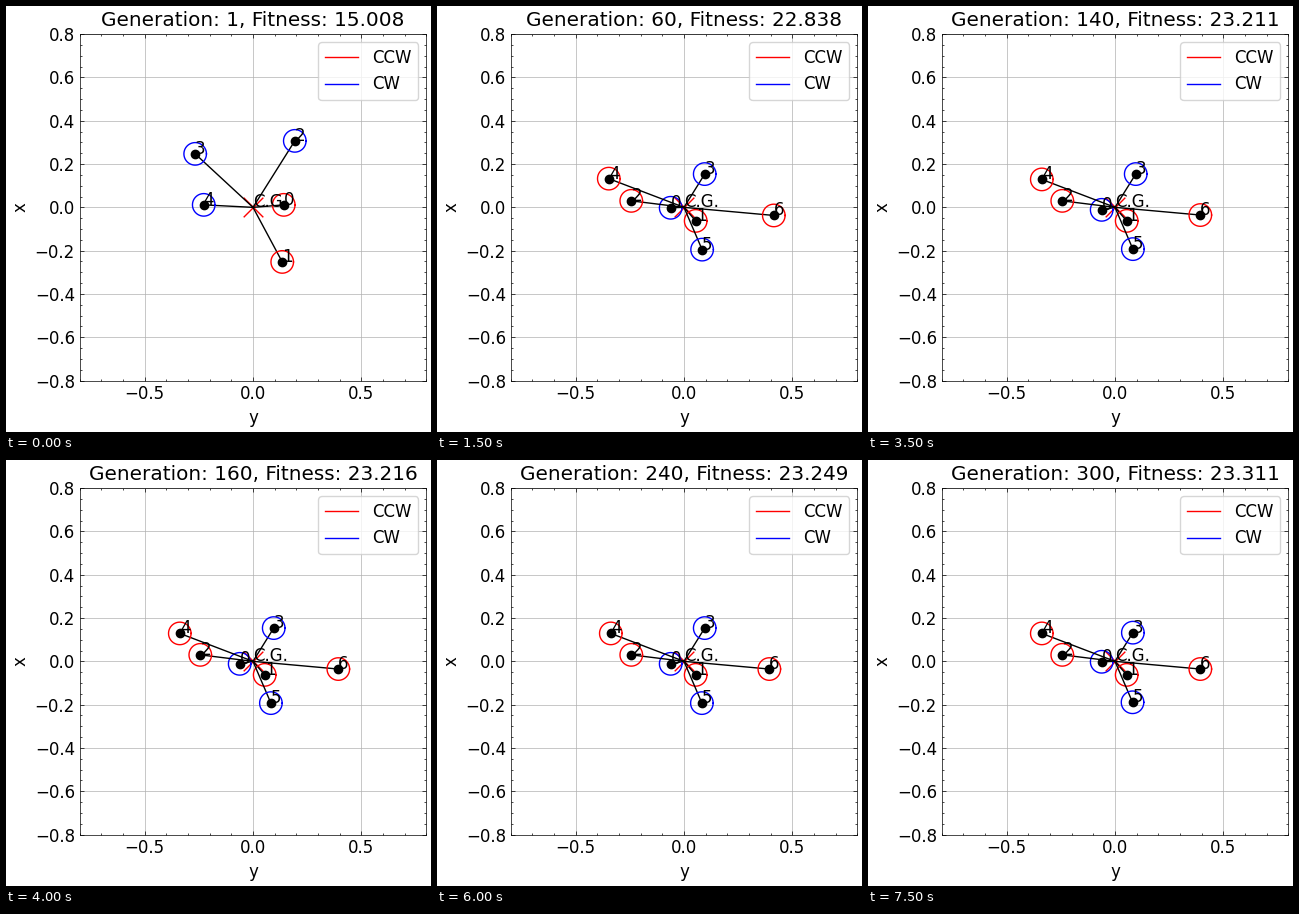
Animation, 425 px wide and 426 px high, one loop 8 s. Source, as a matplotlib script:

```python
import numpy as np
import matplotlib.pyplot as plt
from matplotlib.animation import FuncAnimation

plt.rcParams.update({
    "font.family": "DejaVu Sans", "font.size": 12,
    "axes.linewidth": 0.5, "grid.linewidth": 0.5, "lines.linewidth": 1.0,
    "xtick.top": True, "ytick.right": True,
})
for axis in ("xtick", "ytick"):
    plt.rcParams.update({
        f"{axis}.direction": "in", f"{axis}.minor.visible": True,
        f"{axis}.major.size": 3, f"{axis}.major.width": 0.5,
        f"{axis}.minor.size": 1.5, f"{axis}.minor.width": 0.5,
    })

W, H, DPI = 425, 426, 100
LEFT, BOTTOM, SIDE = 73.75, 51.4, 346.5
FRAMES, STEP = 16, 20
RADIUS = 0.052

# Random start with five rotors, converged layout with seven
START = np.array([(0.142, 0.0115), (0.135, -0.252), (0.193, 0.307),
                  (-0.267, 0.247), (-0.2275, 0.0115)])
FINAL = np.array([(-0.0615, -0.002), (0.054, -0.0625), (-0.2435, 0.030),
                  (0.0825, 0.1325), (-0.338, 0.129), (0.081, -0.189),
                  (0.394, -0.0355)])
START_CW, FINAL_CW = {2, 3, 4}, {0, 3, 5}

SPREAD = np.array([0, 0, 0, 0, 0.22, 0.1, 0.42])
SETTLED = 120

FITNESS_KEYS = {1: 15.008, 60: 22.838, 100: 23.207, 140: 23.211,
                200: 23.224, 260: 23.260, 300: 23.311}


def fitness(gen):
    return np.interp(np.log(gen), np.log(list(FITNESS_KEYS)),
                     list(FITNESS_KEYS.values()))


def layout(gen):
    if gen == 1:
        return START, START_CW
    # Outer rotors are pulled in as the search converges
    ease = max(0, 1 - gen / SETTLED) ** 3
    spots = FINAL * (1 + SPREAD * ease)[:, None]
    # Late refinements
    if gen < 260:
        spots[3] *= 1.16
    if gen < 280:
        spots[5] *= 1.02
    if 80 <= gen < 260:
        spots[0, 1] -= 0.0095
    return spots, FINAL_CW


fig = plt.figure(figsize=(W / DPI, H / DPI), dpi=DPI, facecolor="white")
ax = fig.add_axes([LEFT / W, BOTTOM / H, SIDE / W, SIDE / H])
ax.set(xlim=(-0.8, 0.8), ylim=(-0.8, 0.8), xlabel="y", ylabel="x",
       xticks=[-0.5, 0, 0.5], yticks=np.linspace(-0.8, 0.8, 9))
ax.grid(True)
title = ax.set_title("", fontsize="large")

ax.scatter(0, 0, marker="x", s=200, color="red", linewidths=1)
ax.text(0, 0, "C.G.")

turn = np.linspace(0, 2 * np.pi, 100)
ring_x, ring_y = RADIUS * np.cos(turn), RADIUS * np.sin(turn)
rotors = []
for k in range(len(FINAL)):
    rod, = ax.plot([], [], "k-")
    dot, = ax.plot([], [], "ko", markersize=6)
    ring, = ax.plot([], [])
    rotors.append((rod, dot, ring, ax.text(0, 0, str(k))))

keys = [ax.plot([], [], color=c, label=n)[0]
        for c, n in (("red", "CCW"), ("blue", "CW"))]
ax.legend(handles=keys, loc="upper right")


def draw(i):
    gen = max(1, i * STEP)
    title.set_text(f"Generation: {gen}, Fitness: {fitness(gen):.3f}")
    spots, cw = layout(gen)
    for k, parts in enumerate(rotors):
        for part in parts:
            part.set_visible(k < len(spots))
    for k, (x, y) in enumerate(spots):
        rod, dot, ring, label = rotors[k]
        rod.set_data([0, x], [0, y])
        dot.set_data([x], [y])
        ring.set_data(x + ring_x, y + ring_y)
        ring.set_color("blue" if k in cw else "red")
        label.set_position((x, y))
    return []


anim = FuncAnimation(fig, draw, frames=FRAMES, init_func=lambda: draw(0),
                     interval=500, repeat=True, repeat_delay=0, blit=False)
plt.show()
```
